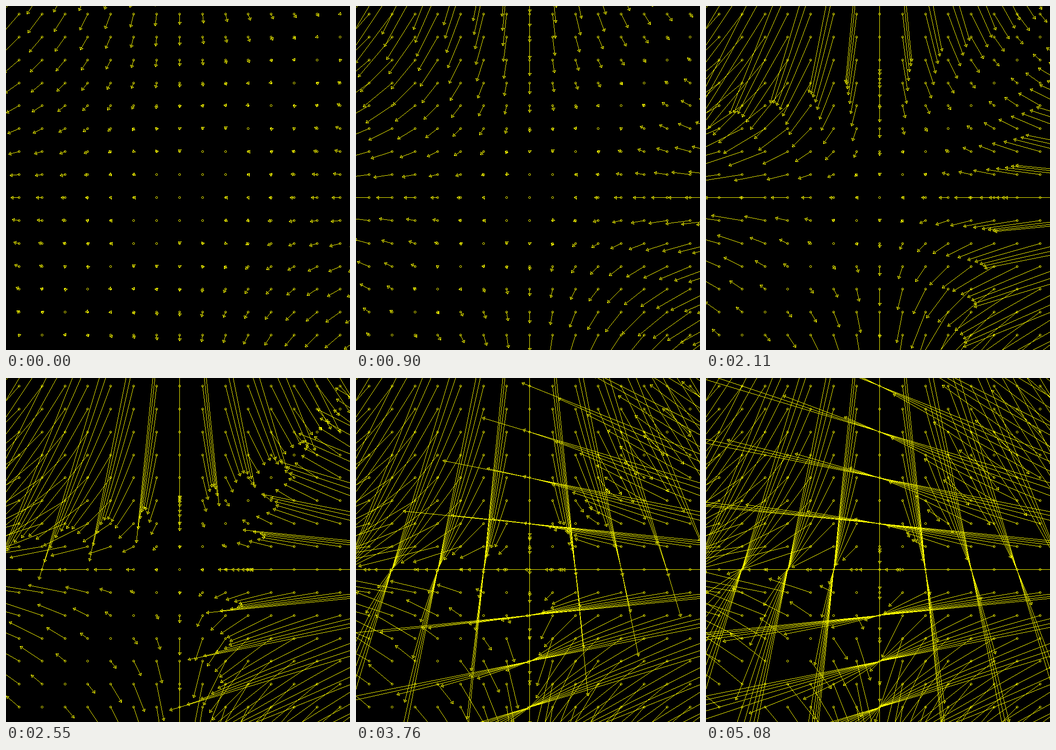
Recreate the animation shown at these times as an HTML page with a canvas. Size 748 by 748 pixels, loop 5.73 s.

```html
<!DOCTYPE html>
<html>
<head>
<meta charset="utf-8">
<title>Vector field</title>
<style>
html, body { margin: 0; width: 100%; height: 100%; overflow: hidden; background: #000; }
canvas { display: block; width: 748px; height: 748px; }
</style>
</head>
<body>
<canvas id="stage" width="748" height="748"></canvas>
<script>
const SIZE = 748, LOOP = 5730, CELL = SIZE / 15, OX = 377.35, OY = 416.4, REACH = 10;
const BASE = 0.3705, GROWTH = 1.1, BEAT = 110;
const HEAD = 5, HALF = 3.5;
const BLACK = 0xff000000, YELLOW = 0xff00ffff;

// Bursts of growth: first beat, last beat, powers of GROWTH gained.
const bursts = [
  [120, 560, 6], [680, 900, 4], [1230, 1430, 4], [1550, 1670, 2], [1990, 2550, 9],
  [2980, 3320, 4], [3540, 3760, 4], [3970, 3970, 1], [4300, 4640, 5]
];

const ctx = document.getElementById('stage').getContext('2d');
const image = ctx.createImageData(SIZE, SIZE);
const pixels = new Uint32Array(image.data.buffer);

function plot(x, y) {
  if (x >= 0 && y >= 0 && x < SIZE && y < SIZE) pixels[y * SIZE + x] = YELLOW;
}

function line(x0, y0, x1, y1) {
  const n = Math.max(Math.abs(x1 - x0), Math.abs(y1 - y0)) || 1;
  for (let i = 0; i <= n; i++)
    plot(Math.round(x0 + (x1 - x0) * i / n), Math.round(y0 + (y1 - y0) * i / n));
}

function ring(x, y) {
  for (let i = -1; i <= 1; i++) {
    plot(x + i, y - 2);
    plot(x + i, y + 2);
    plot(x - 2, y + i);
    plot(x + 2, y + i);
  }
}

function arrow(x, y, dx, dy) {
  const len = Math.hypot(dx, dy);
  if (!len) return;
  const tx = x + dx, ty = y + dy, cx = dx / len, cy = dy / len;
  const corner = side => [
    Math.round(tx - cx * HEAD - cy * HALF * side),
    Math.round(ty - cy * HEAD + cx * HALF * side)
  ];
  const a = corner(1), b = corner(-1);
  line(x, y, tx, ty);
  line(tx, ty, ...a);
  line(...a, ...b);
  line(...b, tx, ty);
}

function power(t) {
  let n = 0;
  for (const [from, to, gain] of bursts) {
    if (t < from) break;
    const gaps = Math.round((to - from) / BEAT);
    const done = t >= to ? gaps : Math.floor((t - from) / (to - from) * gaps);
    n += Math.floor(gain * (done + 1) / (gaps + 1));
  }
  return n;
}

let shown = -1;
function draw(t) {
  const n = power(t);
  if (n === shown) return;
  shown = n;
  const scale = BASE * GROWTH ** n;
  pixels.fill(BLACK);
  for (let x = -REACH; x <= REACH; x++)
    for (let y = -REACH; y <= REACH; y++) {
      const px = Math.floor(OX + x * CELL), py = Math.floor(OY - y * CELL);
      const k = (y - x) * scale;
      ring(px, py);
      arrow(px, py, Math.trunc(x * k), Math.trunc(y * k));
    }
  ctx.putImageData(image, 0, 0);
}

const start = performance.now();
function tick() {
  draw((performance.now() - start) % LOOP);
  requestAnimationFrame(tick);
}
tick();
</script>
</body>
</html>
```
